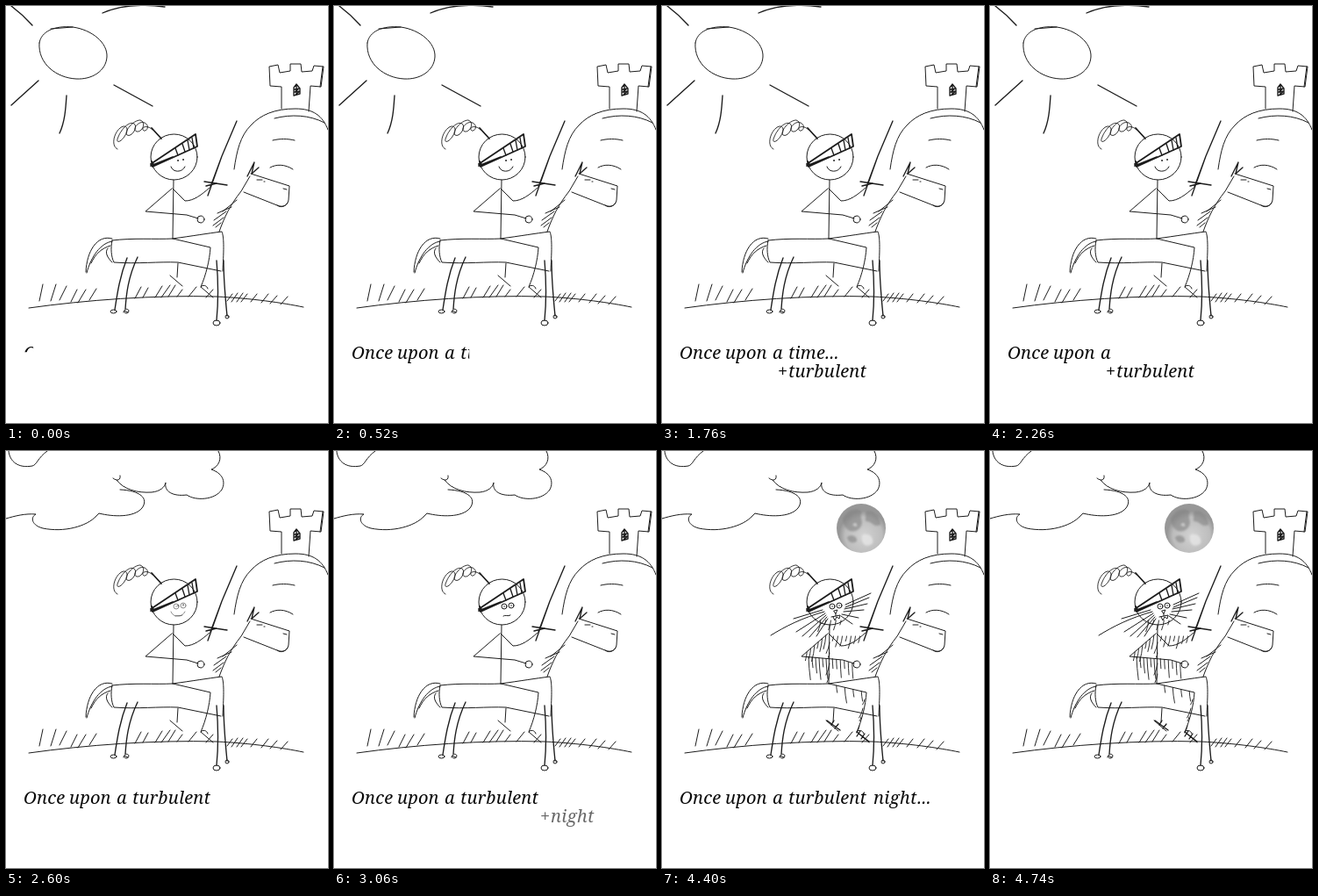
An HTML page for the animation above (4760 ms loop, 367 by 475 pixels).

```html
<!DOCTYPE html>
<html lang="en">
<head>
<meta charset="utf-8">
<title>A knight's tale</title>
<style>
html, body { margin: 0; width: 100%; height: 100%; overflow: hidden; background: #fff; }
svg { display: block; width: 367px; height: 475px; fill: none; stroke: #1c1c1c; stroke-width: 1; stroke-linecap: round; stroke-linejoin: round; }
text { font: italic 20px "Noto Serif", serif; letter-spacing: .2px; fill: #0a0a0a; stroke: none; }
.bold { stroke-width: 1.8; }
.mid { stroke-width: 1.35; }
.fine { stroke-width: .9; }
</style>
</head>
<body>
<svg viewBox="0 0 367 475">
  <defs>
    <clipPath id="pen"><path id="written"/></clipPath>
    <radialGradient id="lunar" cx=".55" cy=".65">
      <stop offset="0" stop-color="#d2d2d2"/><stop offset=".75" stop-color="#bdbdbd"/><stop offset="1" stop-color="#979797"/>
    </radialGradient>
    <filter id="soft"><feGaussianBlur stdDeviation="1.3"/></filter>
  </defs>

  <g id="sun">
    <path d="M38 42C40 29 55 22 76 24C98 27 116 42 115 58C114 74 98 84 80 83C58 82 36 66 38 42M51 26L76 24"/>
    <path class="mid" d="M6 0C14 6 22 13 30 22M6 113L37 85M69 102C68 118 67 132 61 145M123 90L167 114M110 8C128 0 150 -3 181 1"/>
  </g>

  <g id="clouds">
    <path d="M0 77C10 74 22 71 34 72C27 76 30 85 42 88C66 93 92 86 103 74L106 71C122 75 146 76 155 65C163 54 153 45 130 44M3 0C4 12 14 20 30 17C35 16 36 8 47 0"/>
    <path d="M122 31C127 35 131 33 130 28M126 33C134 44 150 48 166 47C176 46 181 41 182 36C180 46 190 52 206 50C216 57 238 56 246 44C251 34 246 25 234 21C242 18 247 9 242 0"/>
  </g>

  <g id="moon" stroke="none">
    <circle cx="227" cy="88" r="28" fill="url(#lunar)"/>
    <g filter="url(#soft)">
      <path fill="#828282" opacity=".6" d="M206 78C210 66 222 64 228 69C224 77 231 80 226 87C219 96 207 91 206 78M232 69C241 66 249 75 249 84C241 88 239 79 232 80ZM211 98C216 94 223 97 222 103C217 106 212 104 211 98"/>
      <path fill="#e6e6e6" opacity=".8" d="M228 96C235 92 242 98 240 105C234 111 226 107 228 96M217 84L221 82L222 86Z"/>
    </g>
  </g>

  <g id="castle">
    <path d="M260 186C263 165 267 148 279 136C290 124 306 117 330 117C350 117 361 125 367 141M306 128C325 123 346 124 363 133M304 153C312 151 321 151 329 153M301 184C308 180 318 180 327 186"/>
    <path d="M314 117L314 92L301 91L300 69L310 67L312 76L324 74L324 66L336 66L337 75L349 74L351 68L362 69L359 92L347 91L345 120M361 69L358 92"/>
    <path class="mid" d="M328 102L328 93L331 89L335 94L335 100L328 102M329 95L334 94L329 98L335 97L330 101M331 90L331 101"/>
  </g>

  <g id="meadow">
    <path d="M26 344C90 335 170 329 240 331C280 333 315 338 339 343"/>
    <path d="M42 317L38 336M57 317L51 336M69 319L61 335M81 323L74 337M91 323L82 338M103 322L95 335M154 320L147 333M162 321L156 332M178 319L170 332M187 318L177 332M193 318L185 331M201 323L195 331M217 320L208 331M236 323L228 332M258 328L252 336M264 327L257 337M270 327L263 337M275 328L268 337M286 328L279 337M299 328L291 338M309 330L301 339M321 331L313 340"/>
  </g>

  <g id="horse">
    <path d="M121 267C145 264 170 266 190 265C212 262 230 259 246 257C249 264 248 282 247 302M121 267C119 276 120 286 123 292C150 294 174 291 196 292L245 302"/>
    <path d="M121 265C104 260 92 279 91 303M121 268C108 270 97 285 92 304M119 273C109 276 102 282 97 293M116 276C112 281 116 287 121 292"/>
    <path d="M278 194L268 211C256 226 249 240 243 257M279 191L323 205L322 221C321 227 316 230 309 227L271 212M286 198L292 198M294 200L295 200M316 208L320 209M309 227C313 230 318 229 321 224"/>
    <path class="mid" d="M275 194L283 178L280 191L288 184"/>
    <path d="M263 221L247 234M257 229L241 236M251 234L237 244M248 241L236 250M245 247L239 252"/>
    <path class="mid" d="M138 287C130 307 127 326 124 346M150 286C139 309 137 329 136 345M240 290C242 314 242 338 240 358M248 290C248 313 250 333 252 353"/>
    <ellipse cx="122.500" cy="348" rx="3.500" ry="2"/>
    <path d="M134 349C134 345 139 344 140 347C140 351 134 351 135 347L139 349"/>
    <ellipse cx="240" cy="361" rx="4" ry="3"/><circle cx="252" cy="354" r="2"/>
  </g>

  <g id="knight">
    <path class="fine" d="M127 163C120 160 122 146 130 139C136 134 141 139 136 147C131 156 124 157 128 149C132 139 141 131 146 134C151 138 143 150 138 147C134 143 145 130 153 130C160 132 156 144 149 143C143 141 151 130 158 133C164 136 161 143 157 142C153 139 160 134 167 141"/>
    <path class="bold" d="M166 139L177 151"/>
    <ellipse cx="191.500" cy="172" rx="26.500" ry="26"/>
    <path class="bold" d="M165 180L216 146L218 160L167 183ZM166 177L169 182M165 182L190 172"/>
    <path class="mid" d="M193 162L196 170M201 157L204 166M207 153L209 164M212 150L214 162"/>
    <path d="M191 198L190 265M189 208L159 234L206 238L219 242M190 208L204 222C214 222 223 215 232 207"/>
    <circle cx="222" cy="243" r="4"/>
    <path class="mid" d="M263 131L246 171L230 216M246 171L233 206M226 200L252 204M228 205L240 202"/>
    <path d="M190 265L233 275C232 290 228 306 222 320L236 332M222 320C224 317 229 318 230 322M196 293L195 309M187 307L201 319"/>
  </g>
  <g id="smile">
    <path d="M188 183C190 190 201 190 204 183"/>
    <path class="bold" d="M196 176h.1M202 175h.1"/>
  </g>
  <g id="stare">
    <circle cx="194" cy="177" r="3"/><circle cx="202" cy="176" r="3"/>
    <path class="mid" d="M194 177h.1M202 176h.1"/>
  </g>
  <path id="worry" d="M193 188C195 186 198 189 201 187"/>
  <g id="beast">
    <path d="M196 182L200 181L198 185ZM198 185L198 188M193 189L203 187L202 191L199 189L197 193L195 189"/>
    <path d="M209 175L238 162M209 178L236 167M208 180L234 174M207 183L230 181M205 186L224 190M204 188L217 197"/>
    <path d="M183 181L150 191M185 183C160 190 140 200 124 210M186 185L153 206M187 187L160 211M188 189L168 212M189 191L176 211"/>
    <path id="fur" class="fine"/>
    <path class="mid" d="M188 307L203 318M196 307L193 312M201 311L197 316M222 320L236 331M226 319L222 325M231 322L227 328"/>
  </g>

  <g id="caption">
    <g clip-path="url(#pen)">
      <text y="402"><tspan x="20">Once</tspan><tspan x="72">upon</tspan><tspan x="126">a</tspan></text>
      <text id="time" x="144" y="402">time...</text>
    </g>
    <text id="turbulent" x="144" y="402">turbulent</text>
    <text id="night" x="241" y="402">night</text>
    <text id="dots" x="291" y="402">...</text>
    <text id="addTurbulent" y="423"><tspan x="132">+</tspan><tspan x="144">turbulent</tspan></text>
    <text id="addNight" y="423"><tspan x="235">+</tspan><tspan x="247">night</tspan></text>
  </g>
</svg>
<script>
const LOOP = 4760;
const el = id => document.getElementById(id);
const show = (id, alpha) => { el(id).style.opacity = alpha; };

// Strokes of uneven length hanging from a limb
function hairs(x1, y1, x2, y2, count, dx, dy) {
  let d = '';
  for (let i = 0; i < count; i++) {
    const u = (i + .5) / count, k = .75 + .35 * Math.sin(i * 2.3 + x1);
    d += `M${x1 + (x2 - x1) * u} ${y1 + (y2 - y1) * u}q${dx * k * .2} ${dy * k * .5} ${dx * k} ${dy * k}`;
  }
  return d;
}
el('fur').setAttribute('d',
  hairs(189, 208, 163, 231, 6, -3, 17) +
  hairs(165, 234, 189, 237, 6, 2, 24) +
  hairs(191, 212, 191, 260, 4, -4, 13) +
  hairs(192, 236, 219, 242, 6, 1, 18) +
  hairs(193, 211, 228, 211, 7, -3, 13) +
  hairs(194, 266, 232, 275, 4, 2, 16) +
  hairs(232, 278, 224, 318, 4, -4, 10) +
  hairs(178, 193, 207, 193, 5, -3, 12));

// Piecewise linear value through [time, value] points
function along(points, t) {
  for (let i = 1; i < points.length; i++) {
    const [t0, v0] = points[i - 1], [t1, v1] = points[i];
    if (t < t1) return v0 + (v1 - v0) * (t - t0) / (t1 - t0);
  }
  return points[points.length - 1][1];
}

function draw(now) {
  const t = now % LOOP;
  const fade = (a, b) => Math.min(1, Math.max(0, (t - a) / (b - a)));
  const stormy = t >= 2340, moonlit = t >= 3580;
  const scared = fade(2520, 2680), hairy = fade(3700, 3920);

  const x = along([[0, 31], [60, 37], [540, 159], [1080, 197], [1140, 210]], t);
  const y = along([[0, 394], [60, 412]], t);
  el('written').setAttribute('d', `M0 380H${x}V${y}H0Z`);

  show('sun', +!stormy);
  show('clouds', +stormy);
  show('moon', +moonlit);
  show('smile', 1 - scared);
  show('stare', scared);
  show('worry', scared * (1 - hairy));
  show('beast', hairy);

  show('time', 1 - fade(2160, 2260));
  show('addTurbulent', stormy ? 0 : fade(1260, 1760));
  show('turbulent', +stormy);
  show('addNight', moonlit ? 0 : fade(2780, 3240));
  show('night', +moonlit);
  show('dots', fade(4200, 4400));
  show('caption', 1 - fade(4580, 4740));
}

function tick() {
  draw(performance.now());
  requestAnimationFrame(tick);
}
tick();
</script>
</body>
</html>
```
